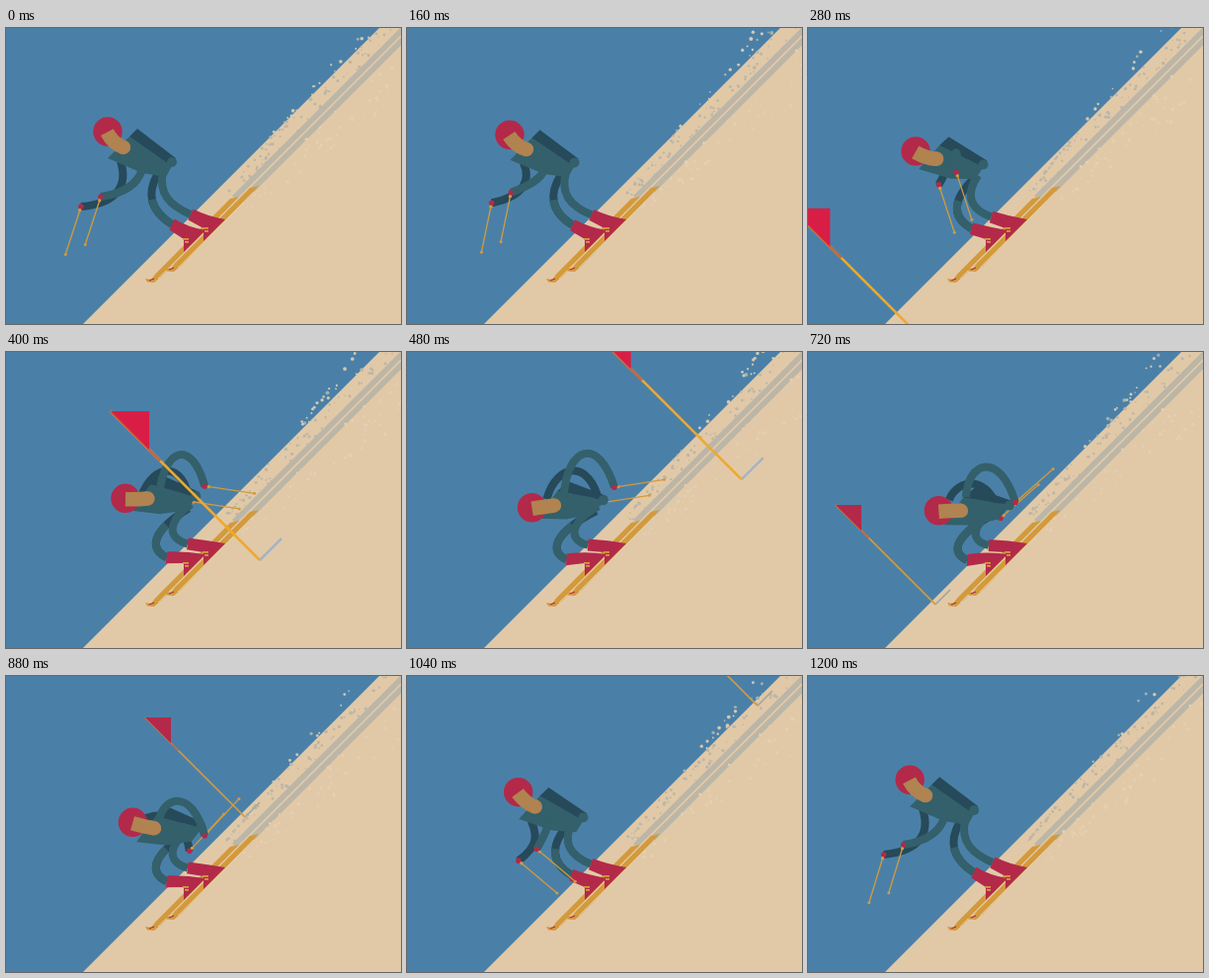
Animation, 400 px wide and 300 px high, one loop 1280 ms. Source, as an HTML page with a canvas:

```html
<!DOCTYPE html>
<html lang="en">
<head>
<meta charset="utf-8">
<title>Downhill skier</title>
<style>
  html, body { margin: 0; width: 100%; height: 100%; overflow: hidden; background: #4a80a8; }
  canvas { display: block; width: 100vw; height: 100vh; }
</style>
</head>
<body>
<canvas id="stage" width="400" height="300"></canvas>
<script>
const ctx = document.getElementById('stage').getContext('2d');
const LOOP = 1280, STEP = 40, LAST = 1200;
const SKY = '#4a80a8', SNOW = '#e1c9a8', TRACK = '#bcb6a7', RED = '#b32949',
      TEAL = '#33606a', DARK = '#264a59', SKIN = '#b08350', GOLD = '#d39a3c';

// Key poses as x, y pairs: standing open, and tucked.
const torso = {
  open: [133,102, 172,132, 166,139, 125,110, 162,151, 138,147, 103,132],
  tuck: [168,136, 207,150, 200,153, 156,146, 192,168, 165,174, 137,174]
};
const frontLeg = {
  open: [159,145, 154,168, 166,180, 187,189],
  tuck: [196,157, 167,172, 161,191, 183,196]
};
const backLeg = {
  open: [154,147, 142,168, 146,185, 168,199],
  tuck: [194,162, 160,178, 138,200, 161,211]
};
const frontArm = {
  open: [138,143, 133,160, 118,168, 96,171],
  tuck: [160,147, 162,105, 194,95, 210,147]
};
const backArm = {
  open: [116,135, 124,160, 112,178, 76,181],
  tuck: [143,150, 152,122, 185,118, 195,163]
};

const smooth = u => u * u * (3 - 2 * u);
const blend = (part, k) => part.open.map((a, i) => a + (part.tuck[i] - a) * k);
const shift = (pts, dx, dy) => pts.map((v, i) => v + (i % 2 ? dy : dx));

function poly(color, ...p) {
  ctx.fillStyle = color;
  ctx.beginPath();
  for (let i = 0; i < p.length; i += 2) ctx.lineTo(p[i], p[i + 1]);
  ctx.closePath();
  ctx.fill();
}

function line(color, width, x1, y1, x2, y2) {
  ctx.strokeStyle = color;
  ctx.lineWidth = width;
  ctx.beginPath();
  ctx.moveTo(x1, y1);
  ctx.lineTo(x2, y2);
  ctx.stroke();
}

function dot(color, x, y, r) {
  ctx.fillStyle = color;
  ctx.beginPath();
  ctx.arc(x, y, r, 0, 7);
  ctx.fill();
}

function limb(color, p) {
  ctx.strokeStyle = color;
  ctx.lineWidth = 8;
  ctx.beginPath();
  ctx.moveTo(p[0], p[1]);
  ctx.bezierCurveTo(...p.slice(2));
  ctx.stroke();
}

function rand(n) {
  const v = Math.sin(n * 12.9898 + 4.1) * 43758.5453;
  return v - Math.floor(v);
}

function slope() {
  ctx.fillStyle = SKY;
  ctx.fillRect(0, 0, 400, 300);
  poly(SNOW, 78,300, 378,0, 400,0, 400,300);
  line(TRACK, 5.5, 231,172, 411,-8);
  line(TRACK, 5.5, 249,164.5, 425,-11.5);
}

// Snow thrown up behind the skis; x + y is the height across the slope.
function spray(t) {
  const life = 320;
  for (let i = 0; i < 160; i++) {
    const clock = t + rand(i) * life, cycle = Math.floor(clock / life) % 4;
    const u = clock / life % 1, seed = i * 7 + cycle * 1931 + 500;
    const spread = rand(seed);
    let sum, color, r = 0.6 + rand(seed + 1) * 1.1;
    if (i < 38) {
      sum = 390 - u * (12 + spread * 32);
      r += u * 0.4;
      color = sum > 378 ? TRACK : rand(seed + 2) < 0.7 ? '#d5c7ad' : '#a3b0ad';
    } else if (i < 95) {
      sum = 385 + spread * 17 - u * 6;
      color = sum > 378 ? TRACK : '#a9b2a9';
    } else {
      sum = 416 + spread * (15 + u * 55);
      color = '#e5d0b3';
    }
    const x = 226 + u * 180 + (sum - 396) / 2;
    dot(color, x, sum - x, r);
  }
}

// A gate with its foot at x, y; size is the pole's extent on each axis.
function gate(x, y, size, flag, foot, width, colors) {
  const left = x - size, top = y - size;
  line(colors.foot, width, x, y, x + foot, y - foot);
  line(colors.pole, width, left, top, x, y);
  line(colors.sleeve, width, left, top, left + size / 3, top + size / 3);
  poly(colors.flag, left, top, left + flag, top, left + flag, top + flag);
}

function ski(dx, dy) {
  ctx.save();
  ctx.translate(dx, dy);
  poly(GOLD, 141,254, 143,257.5, 150,258, 157,252, 236,171, 227,173, 151,249.5, 147,255);
  line('#ead0a0', 0.8, 154,254, 222,186);
  line(RED, 1.2, 145,256, 150,254);
  ctx.restore();
}

// The cuff is centred on the end of the leg and tilts with the shin.
function boot(leg, tilt, dx, dy) {
  const [x, y] = leg.slice(6), nx = 6 * Math.sin(tilt), ny = 6 * Math.cos(tilt);
  ctx.fillStyle = RED;
  ctx.beginPath();
  ctx.moveTo(x + nx, y - ny);
  ctx.quadraticCurveTo(204 + dx, 191 + dy, 222 + dx, 194 + dy);
  ctx.lineTo(200 + dx, 216 + dy);
  ctx.lineTo(200 + dx, 203 + dy);
  ctx.lineTo(x - nx, y + ny);
  ctx.fill();
  ctx.fillStyle = GOLD;
  ctx.fillRect(199 + dx, 202 + dy, 6, 1.8);
  ctx.fillRect(201 + dx, 205 + dy, 4, 1.8);
}

function stick(arm, angle) {
  const [x, y] = arm.slice(6), dx = Math.cos(angle), dy = Math.sin(angle);
  line(GOLD, 1.3, x, y, x + 51 * dx, y + 51 * dy);
  dot(GOLD, x + 51 * dx, y + 51 * dy, 1.5);
  dot(RED, x, y, 2.8);
  dot(GOLD, x + 4 * dx, y + 4 * dy, 1.7);
}

function face(x, y, angle, bend) {
  ctx.save();
  ctx.translate(x, y);
  ctx.rotate(angle);
  ctx.strokeStyle = SKIN;
  ctx.lineWidth = 14.5;
  ctx.beginPath();
  ctx.moveTo(0, 1);
  ctx.quadraticCurveTo(13, bend, 22.5, 0);
  ctx.stroke();
  dot(SKIN, 22.5, 0, 7.25);
  ctx.restore();
}

function skier(t) {
  const phase = 2 * Math.PI * t / LOOP;
  const wave = (1 - Math.cos(phase)) / 2;
  const tuck = smooth(wave);
  const reach = smooth(Math.min(1, wave * 1.2)); // arms lead the body
  const sway = Math.sin(phase) * Math.min(1, tuck * 4);
  const arm = part => [
    ...blend(part, tuck).slice(0, 2),
    ...shift(blend(part, reach), 0, -14 * sway).slice(2)
  ];

  const body = shift(blend(torso, tuck), -3 * sway, -4 * sway);
  const near = arm(frontArm), far = arm(backArm);
  const nearLeg = blend(frontLeg, tuck), farLeg = blend(backLeg, tuck);
  const angle = (108 - 138 * reach + 30 * sway) * Math.PI / 180;
  const tilt = 0.45 - 0.4 * tuck;

  ski(0, 0);
  ski(20, -11);
  limb(DARK, far);
  stick(far, angle);

  // The far thigh is in shade, its shin is not.
  limb(DARK, farLeg);
  ctx.setLineDash([0, 28, 200, 0]);
  limb(TEAL, farLeg);
  ctx.setLineDash([]);
  boot(farLeg, tilt, -20, 11);
  limb(TEAL, nearLeg);
  boot(nearLeg, tilt, 0, 0);

  poly(TEAL, ...body.slice(6, 8), ...body.slice(4, 6), ...body.slice(2, 4), ...body.slice(8));
  poly(DARK, ...body.slice(0, 8));
  dot(TEAL, body[2] - 4, body[3] + 4, 5);
  stick(near, angle);
  limb(TEAL, near);
  dot(RED, near[6], near[7], 2.5);

  const x = 103 + 28 * tuck - 4 * sway, y = 105 + 56 * tuck;
  dot(RED, x, y, 14.7);
  face(x, y, (45 - 48 * tuck - 8 * sway) * Math.PI / 180, 5 * (1 - tuck));
}

function draw(t) {
  const far = (t - 880) * 0.706, near = (t - 400) * 1.022;
  slope();
  spray(t);
  gate(242 + far, 143 - far, 101, 26, 15, 1.7,
    { foot: '#aaa898', pole: GOLD, sleeve: '#c0683f', flag: RED });
  skier(t);
  gate(257 + near, 211 - near, 151, 39, 22, 2.5,
    { foot: '#a3b3c6', pole: '#f0a82d', sleeve: '#c8643c', flag: '#d81e45' });
}

const start = performance.now();
function tick() {
  const t = (performance.now() - start) % LOOP;
  draw(Math.min(LAST, Math.floor(t / STEP) * STEP));
  requestAnimationFrame(tick);
}
tick();
</script>
</body>
</html>
```
